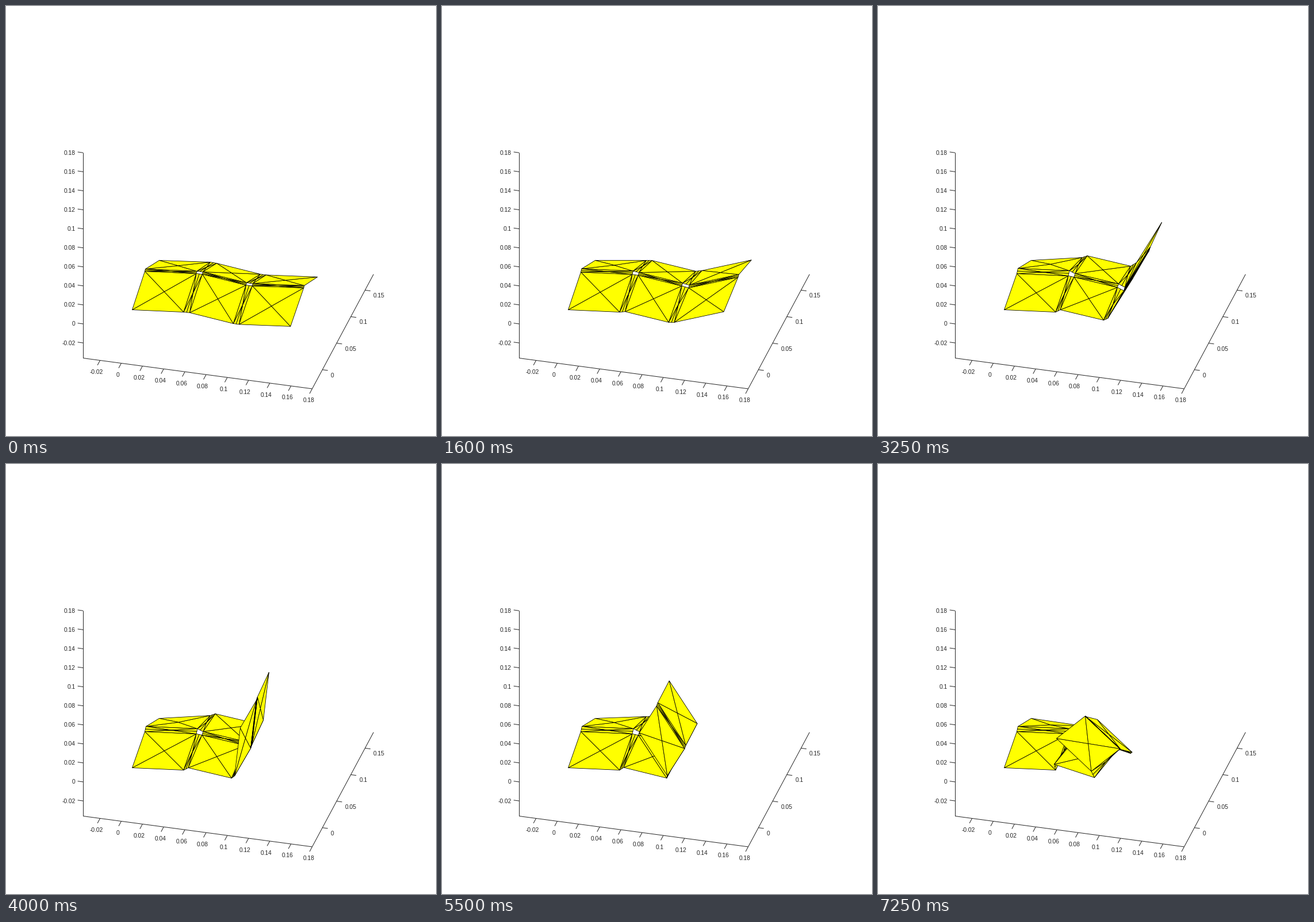
A matplotlib script for the animation above (7.5 s loop, 748 by 748 pixels).

```python
import numpy as np
import matplotlib.pyplot as plt
from matplotlib.animation import FuncAnimation
from matplotlib.collections import PolyCollection

SIZE, DPI = 748, 100
PX = 72 / DPI
FRAMES, STEP = 150, 50
START, END = 450, 7250
GREY = "#262626"

# View from azimuth 15, elevation 30
SCALE = 1910
AZ, EL = np.radians([15, 30])
EX = SCALE * np.array([np.cos(AZ), np.sin(AZ) * np.sin(EL)])
EY = SCALE * np.array([np.sin(AZ), -np.cos(AZ) * np.sin(EL)])
EZ = SCALE * np.array([0, -np.cos(EL)])
LO, HI = -0.036, 0.18
CORNER = np.array([133.6, 612.0])

# Long panel edge, split along the fold line and across it
WIDTH, SKEW = 0.0462, 0.0086
TURN = np.radians(150)


def vec(x, y):
    return np.array([x, y], float)


def smooth(s):
    return s * s * (3 - 2 * s)


def span(t, start, end):
    return np.clip((t - start) / (end - start), 0, 1)


def fold_angle(t):
    s = span(t, START, 6850)
    return TURN * (0.75 * smooth(s) + 0.25 * s)


def column(a, u, v, gap, w):
    """Front and back panel of one column, hinged along the ridge."""
    d = a + v
    e = d + gap
    return [a, a + u, d + u, d], [e, e + u, e + u + w, e + w]


def panel(quad):
    """Four triangles around the crossing of the diagonals."""
    a, b, c, d = quad
    mid = (a + b + c + d) / 4
    return [(p, q, mid) for p, q in ((a, b), (b, c), (c, d), (d, a))]


def crease(p0, p1, q0, q1):
    """Six triangles bridging the edges p0-p1 and q0-q1."""
    m0, m1 = (p0 + q0) / 2, (p1 + q1) / 2
    mid = (m0 + m1) / 2
    edges = ((p0, p1), (q0, q1), (p0, m0), (q0, m0), (p1, m1), (q1, m1))
    return [(a, b, mid) for a, b in edges]


def column_mesh(front, back):
    ridge = crease(front[3], front[2], back[0], back[1])
    return panel(front) + panel(back) + ridge


def bridge(left, right):
    """Creases between two neighbouring columns."""
    return [tri for p, q in zip(left, right)
            for tri in crease(p[1], p[2], q[0], q[3])]


def triangles(t):
    early = smooth(span(t, START, 3250))
    late = span(t, 4700, END) ** 2

    def mix(base, first=(0, 0), last=(0, 0)):
        return vec(*base) + early * vec(*first) + late * vec(*last)

    # Left column stays put, only its ridge and rear corner give way
    left = column(vec(219, 528), vec(89.5, 4), mix((22, -67), (0, 4)),
                  mix((1, -4), (1, -5)), mix((24, -15), (-1, 1)))
    left[1][2] = mix((355, 445), (0, -8), (0, 18))

    # Middle column bends a little, then slides under the fold
    a2 = mix((319, 533), (-2.5, -5), (-10.5, -6))
    u2 = mix((76, 19), (-0.5, -1), (-5.5, 5))
    middle = column(a2, u2, mix((22, -67), (2, 10), (16, 8)),
                    mix((1, -4), (1, -2)), mix((24, -15), (-3, -16), (0, 44)))

    # Right column swings over about the second fold line
    angle = fold_angle(t)
    u3 = (SKEW * EY + WIDTH * (np.cos(angle) * EX + np.sin(angle) * EZ)
          + late * vec(9, -1))
    a3 = a2 + u2 + 0.06 * (u2 + u3) + late * vec(-6, -9)
    right = column(a3, u3, mix((23, -67), (5, 19), (22, 9)),
                   mix((1, -4), (1, -2), (-1, 7)),
                   mix((23, -15), (-3, -28), (0, 48)))

    return (column_mesh(*left) + bridge(left, middle) + column_mesh(*middle)
            + bridge(middle, right) + column_mesh(*right))


fig = plt.figure(figsize=(SIZE / DPI, SIZE / DPI), dpi=DPI, facecolor="white")
ax = fig.add_axes([0, 0, 1, 1])
ax.set_xlim(-0.5, SIZE - 0.5)
ax.set_ylim(SIZE - 0.5, -0.5)
ax.axis("off")


def line(p, q):
    ax.plot(*zip(p, q), color=GREY, lw=PX, solid_capstyle="butt")


def axis(start, unit, values, tick, shift, ha):
    line(start, start + unit * (HI - LO))
    tick = 9.5 * tick / np.hypot(*tick)
    for v in values:
        p = start + unit * (v - LO)
        line(p, p + tick)
        ax.text(*(p + shift), f"{round(v, 2):g}", ha=ha, va="center_baseline",
                color=GREY, family="Liberation Sans", size=10.2 * PX)


fine = np.arange(-1, 10) * 0.02
axis(CORNER, EX, fine, -EY, (-6, 19.5), "center")
axis(CORNER + EX * (HI - LO), EY, np.arange(4) * 0.05, EX, (14.5, 9), "left")
axis(CORNER, EZ, fine, -EX, (-13.5, -0.5), "right")

mesh = PolyCollection([], facecolors="#ffff00", edgecolors="black",
                      linewidths=0.8 * PX, joinstyle="bevel", zorder=3)
ax.add_collection(mesh, autolim=False)


def update(k):
    t = np.clip(k * STEP, START, END)
    mesh.set_verts([np.array(tri) for tri in triangles(t)])
    return (mesh,)


anim = FuncAnimation(fig, update, frames=FRAMES, interval=STEP,
                     repeat=True, repeat_delay=0, blit=False)
plt.show()
```
